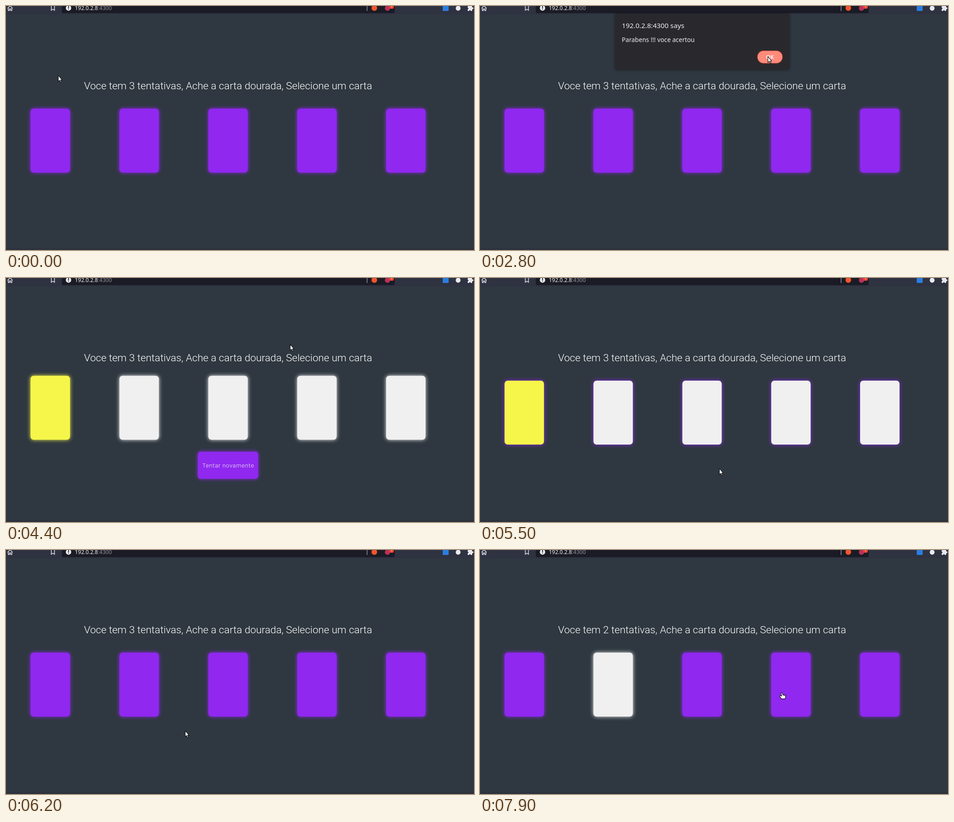
Recreate the animation shown at these times as an HTML page with a canvas. Size 1033 by 542 pixels, loop 8000 ms.

```html
<!DOCTYPE html>
<html lang="pt">
<head>
<meta charset="utf-8">
<title>Carta dourada</title>
<style>
html, body { margin: 0; width: 100%; height: 100%; overflow: hidden; background: #2f3840; }
canvas { display: block; }
</style>
</head>
<body>
<canvas id="stage" width="1033" height="542"></canvas>
<script>
const ctx = document.getElementById('stage').getContext('2d');
const LOOP = 8000, TICK = 100;
const BACK = [47, 56, 64], PURPLE = [144, 40, 240], WHITE = [240, 240, 240], GOLD = [246, 246, 74];
const HOST = '192.0.2.8', PORT = ':4300';
const UI = '"Noto Sans", sans-serif', PAGE = 'Roboto, sans-serif';

// moments of the game
const OPEN = 1400, CLOSE = 3000, WIN = 3100, RESET = 5500, MISS = 6800;

const CARD = { w: 87, h: 142, x: i => 54.2 + 196.2 * i };
const RETRY = { x: 423.5, y: 386, w: 133, h: 60 };
const OK = { x: 612, y: 99, w: 56, h: 28.5 };

// each stroke bends from the last resting point, past a control point, to the next one
const REST = { x: 115, y: 154 };
const STROKES = [
  { from: 300, to: 800, bend: [80, 215], x: 95, y: 265 },
  { from: 1600, to: 2200, bend: [120, 316], x: 380, y: 234 },
  { from: 2200, to: 2400, bend: [462, 190], x: 539, y: 146 },
  { from: 2500, to: 2800, bend: [605, 121], x: 635, y: 112 },
  { from: 4300, to: 5200, bend: [600, 270], x: 528, y: 423 },
  { from: 5900, to: 6400, bend: [411, 447], x: 315, y: 330 },
  { from: 7300, to: 7900, bend: [450, 409], x: 667, y: 316 }
];

const ARROW = new Path2D('M.5 .5V13.6L3.5 11L5.5 15.8L7.4 15L5.5 10.3H9Z');
const HAND = new Path2D('M-2.4 1.6Q-1.2 .2 .2 1.6L1.4 5.4L6.4 6.4Q8 7 7.5 9.6L6.6 14.6H-1.4L-5.6 9.2Q-5.8 7.2 -3.8 7.6L-1.2 8.4Z');
const KNUCKLES = new Path2D('M1.5 5.4V8M3.9 6V8.4M6 6.4V8.8');

const clamp = v => Math.max(0, Math.min(1, v));
const mix = (a, b, p) => a.map((v, i) => v + (b[i] - v) * p);
const rgb = (c, a = 1) => `rgba(${c.map(Math.round).join()},${a})`;
const within = (p, b) => p.x >= b.x && p.x <= b.x + b.w && p.y >= b.y && p.y <= b.y + b.h;

// cubic-bezier(.25, .1, .25, 1), solved by bisection
function ease(p) {
  if (p <= 0 || p >= 1) return clamp(p);
  let lo = 0, hi = 1;
  for (let i = 0; i < 20; i++) {
    const u = (lo + hi) / 2, v = 1 - u;
    if (.75 * v * u + u * u * u < p) lo = u; else hi = u;
  }
  const u = lo, v = 1 - u;
  return .3 * v * v * u + 3 * v * u * u + u * u * u;
}

function pointerAt(t) {
  let pos = REST;
  for (const s of STROKES) {
    if (t <= s.from) break;
    const p = clamp((t - s.from) / (s.to - s.from)), q = 1 - p;
    const bent = (a, b, c) => q * q * a + 2 * q * p * b + p * p * c;
    pos = { x: bent(pos.x, s.bend[0], s.x), y: bent(pos.y, s.bend[1], s.y) };
  }
  return pos;
}

function box(x, y, w, h, r, color) {
  ctx.beginPath();
  ctx.roundRect(x, y, w, h, r);
  ctx.fillStyle = color;
  ctx.fill();
}

function glowBox({ x, y, w, h }, r, color, glow, blur = 8) {
  ctx.save();
  ctx.shadowColor = glow;
  ctx.shadowBlur = blur;
  box(x, y, w, h, r, color);
  ctx.restore();
}

function disc(x, y, r, color) {
  ctx.beginPath();
  ctx.arc(x, y, r, 0, Math.PI * 2);
  ctx.fillStyle = color;
  ctx.fill();
}

function text(s, x, y, font, color, align = 'left') {
  ctx.font = font;
  ctx.textAlign = align;
  ctx.fillStyle = color;
  ctx.fillText(s, x, y);
}

function toolbar() {
  const ink = '#e9eaee', dark = '#1a1b25', bar = '#2f3241';
  box(0, 0, 1033, 19, 0, bar);
  box(123, -10, 735, 26, 4, dark);

  // home and bookmark
  ctx.strokeStyle = ink;
  ctx.lineWidth = 1.4;
  ctx.stroke(new Path2D('M3.5 5L9 -.5L14.5 5M5 4V10H7.6V6.5H10.4V10H13V4M100 -3V9.6L103.5 7L107 9.6V-3'));

  // address
  disc(138, 4.5, 6, ink);
  box(137.2, 0, 1.7, 5.2, 0, dark);
  box(137.2, 6.4, 1.7, 1.7, 0, dark);
  text(HOST, 152, 8.5, '12px ' + UI, '#f2f2f4');
  text(PORT, 152 + ctx.measureText(HOST).width, 8.5, '12px ' + UI, '#8f9098');
  box(796.5, 0, 1, 11, 0, '#c6c7cc');

  // buttons on the right
  disc(813, 4.5, 6.2, '#f4552f');
  disc(842, 5, 5.8, '#b8325c');
  box(846, -4, 10, 10, 3, '#f8432f');
  text('1', 851, 4, '7px ' + UI, '#fff', 'center');
  box(964, -1, 13, 12, 1, '#2b7de0');
  disc(998, 5, 5.4, ink);
  box(1019, 0, 10, 11, 1.5, ink);
  disc(1029.5, 5, 2.2, ink);
  disc(1024, -.5, 2.2, ink);
  disc(1019, 5.5, 1.8, bar);
  disc(1024, 11, 1.8, bar);
}

// the glow switches at once, the face follows
function cardLook(i, t) {
  const face = i === 0 ? GOLD : WHITE;
  const turn = (from, to, start) => ({ fill: mix(from, to, ease((t - start) / 420)), glow: to });
  if (t >= MISS && i === 1) return turn(PURPLE, WHITE, MISS);
  if (t >= RESET) return turn(face, PURPLE, RESET);
  if (t >= WIN) return turn(PURPLE, face, WIN);
  return { fill: PURPLE, glow: PURPLE };
}

function retryButton(t) {
  const alpha = 1 - Math.pow(1 - clamp((t - WIN) / 1000), 1.73);
  glowBox(RETRY, 6, rgb(mix(BACK, PURPLE, alpha)), rgb(PURPLE, alpha));
  ctx.save();
  ctx.globalAlpha = alpha;
  ctx.letterSpacing = '0.7px';
  text('Tentar novamente', 490.5, 420.5, '300 13px ' + PAGE, '#f4f4f4', 'center');
  ctx.restore();
}

function dialog(t, hover) {
  const p = clamp((t - OPEN + TICK) / 300);
  ctx.save();
  ctx.beginPath();
  ctx.rect(0, 14, 1033, 200);
  ctx.clip();
  ctx.globalAlpha = clamp(p * 1.5);
  ctx.translate(0, Math.round(-12 * (1 - p)));
  glowBox({ x: 298.5, y: 17, w: 384, h: 124.5 }, 3, '#29292d', 'rgba(0,0,0,.5)', 6);
  text(HOST + PORT + ' says', 313, 49, '15.2px ' + UI, '#f0f0f2');
  text('Parabens !!! voce acertou', 313, 79.5, '13.7px ' + UI, '#f0f0f2');
  box(OK.x, OK.y, OK.w, OK.h, 14, hover ? '#e4503f' : '#b83c2e');
  box(OK.x + 1, OK.y + 1, OK.w - 2, OK.h - 2, 13, hover ? '#ff8b7b' : '#fb4b35');
  text('OK', 640, 117.5, '600 12px ' + UI, '#fdf0ee', 'center');
  ctx.restore();
}

function pointer({ x, y }, hand) {
  const shape = hand ? HAND : ARROW;
  ctx.save();
  ctx.translate(x, y);
  ctx.lineJoin = 'round';
  ctx.lineWidth = 1.1;
  ctx.strokeStyle = '#0c0c10';
  ctx.fillStyle = '#fff';
  ctx.fill(shape);
  ctx.stroke(shape);
  if (hand) {
    ctx.lineWidth = .7;
    ctx.stroke(KNUCKLES);
  }
  ctx.restore();
}

function draw(t) {
  const won = t >= WIN && t < RESET;
  const asking = t >= OPEN && t < CLOSE;
  const pos = pointerAt(t);

  box(0, 0, 1033, 542, 0, rgb(BACK));
  box(0, 538, 1033, 4, 0, '#2d333c');
  toolbar();

  const left = t >= MISS ? 2 : 3;
  text(`Voce tem ${left} tentativas, Ache a carta dourada, Selecione um carta`,
    490.2, 185, '300 22.6px ' + PAGE, '#fff', 'center');

  let hand = won && within(pos, RETRY);
  for (let i = 0; i < 5; i++) {
    const card = { x: CARD.x(i), y: won ? 217.3 : 228, w: CARD.w, h: CARD.h };
    const { fill, glow } = cardLook(i, t);
    glowBox(card, 7, rgb(fill), rgb(glow));
    hand = hand || within(pos, card);
  }
  if (won) retryButton(t);
  if (asking) {
    dialog(t, within(pos, OK));
    hand = hand && t <= STROKES[1].from;
  }
  pointer(pos, hand);
}

const start = performance.now();
function frame() {
  const t = (performance.now() - start) % LOOP;
  draw(Math.floor(t / TICK) * TICK);
  requestAnimationFrame(frame);
}
frame();
</script>
</body>
</html>
```
